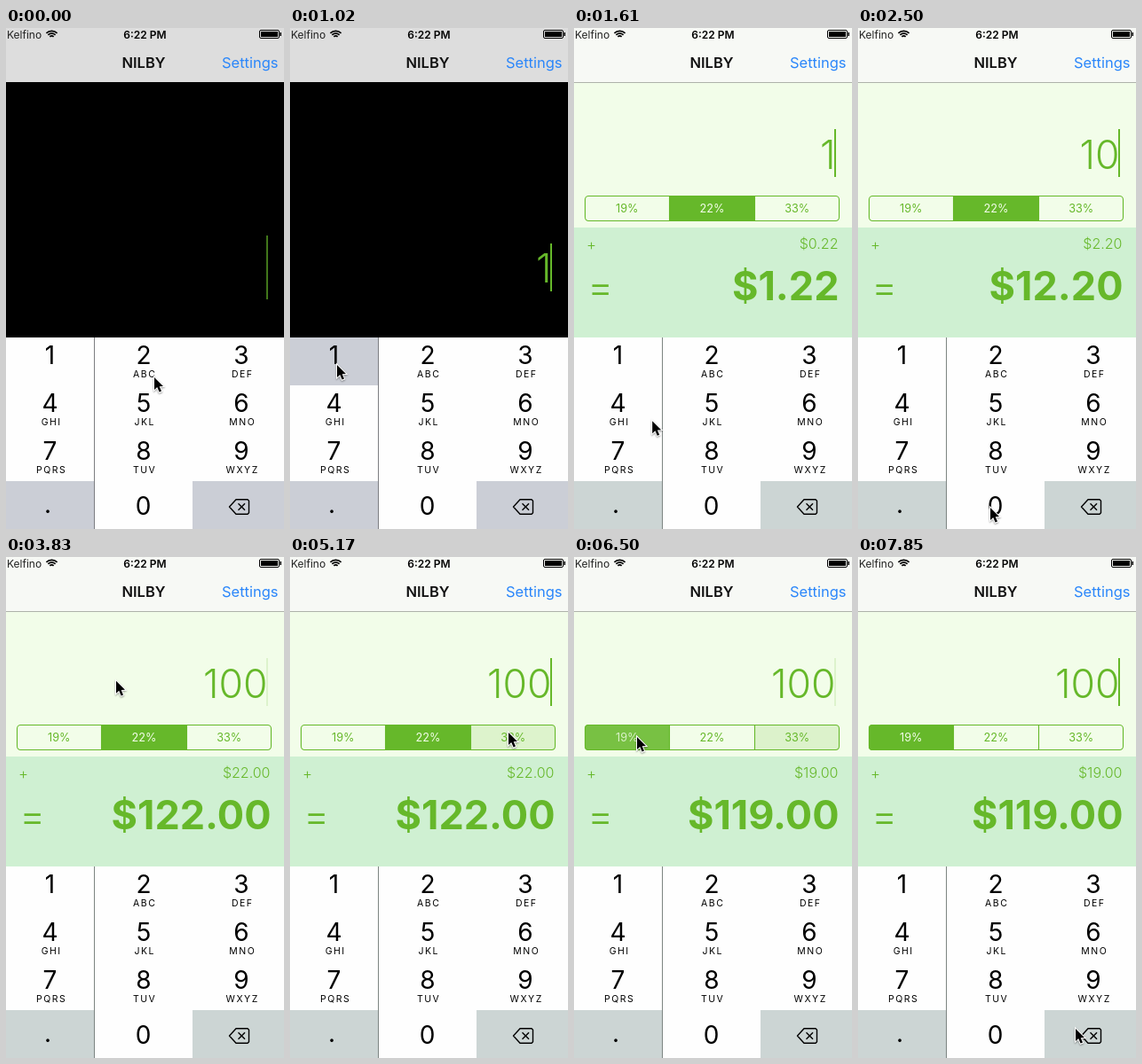
An HTML page with a canvas for the animation above (8 s loop, 313x565 px).

```html
<!DOCTYPE html>
<html lang="en">
<head>
<meta charset="utf-8">
<title>Tip calculator</title>
<style>
html, body { margin: 0; width: 100%; height: 100%; overflow: hidden; background: #000; }
canvas { display: block; width: 100vw; height: 100vh; }
</style>
</head>
<body>
<canvas id="stage"></canvas>
<script>
const W = 313, H = 565, LOOP = 8000;
const canvas = document.getElementById('stage');
const ctx = canvas.getContext('2d');
const ratio = window.devicePixelRatio || 1;
canvas.width = W * ratio;
canvas.height = H * ratio;

const GREEN = '#66b82a', PALE = '#f2fde9', MINT = '#cff0d2', INK = '#000';
const TYPED = [1020, 2300, 2740];
const RATES = [19, 22, 33];
const PRESSES = [
  { at: 5090, up: 5320, seg: 2 },
  { at: 6300, up: 6400, seg: 0 }
];
const KEYS = ['', 'ABC', 'DEF', 'GHI', 'JKL', 'MNO', 'PQRS', 'TUV', 'WXYZ'];
const COLUMNS = [50, 155, 265];

// Pointer path: time, x, y
const POINTER = [
  [0, 167, 394], [120, 167, 394], [500, 105, 390], [840, 53, 380], [1250, 53, 380],
  [1650, 92, 450], [2150, 149, 541], [3150, 149, 541], [3390, 110, 380],
  [3540, 76, 230], [3680, 90, 160], [3830, 124, 140], [3980, 124, 110],
  [4120, 112, 95], [4330, 112, 95], [4560, 135, 76], [4800, 200, 125],
  [5030, 246, 198], [5530, 246, 198], [6040, 71, 203], [6560, 71, 203],
  [6730, 130, 120], [6900, 190, 91], [7060, 245, 190], [7250, 262, 396],
  [7400, 258, 470], [7680, 245, 532], [8000, 245, 532]
];

const clamp = x => Math.max(0, Math.min(1, x));
const lerp = (a, b, p) => a + (b - a) * p;
const ease = x => x < 0.5 ? 2 * x * x : 1 - 2 * (1 - x) * (1 - x);
const mix = (a, b, p) => `rgb(${a.map((v, i) => Math.round(lerp(v, b[i], p))).join(',')})`;

function rect(x, y, w, h, color) {
  ctx.fillStyle = color;
  ctx.fillRect(x, y, w, h);
}

function text(str, x, y, size, { weight = 400, align = 'left', color = INK, spacing = 0 } = {}) {
  ctx.font = `${weight} ${size}px Inter, sans-serif`;
  ctx.letterSpacing = spacing + 'px';
  ctx.textAlign = align;
  ctx.fillStyle = color;
  ctx.fillText(str, x, y);
  ctx.letterSpacing = '0px';
}

function polyline(points, close) {
  ctx.beginPath();
  points.forEach(([x, y]) => ctx.lineTo(x, y));
  if (close) ctx.closePath();
}

function drawHeader(p) {
  rect(0, 0, W, 61, mix([221, 221, 221], [247, 249, 245], p));
  rect(0, 61, W, 1, mix([0, 0, 0], [174, 178, 170], p));

  text('Kelfino', 1, 11.5, 12, { color: '#222' });
  ctx.strokeStyle = INK;
  ctx.lineWidth = 1.7;
  for (const r of [3.6, 6.4, 9.2]) {
    ctx.beginPath();
    ctx.arc(51.5, 12, r - 0.6, -Math.PI * 0.75, -Math.PI * 0.25);
    ctx.stroke();
  }
  text('6:22 PM', 156.5, 11.5, 12, { weight: 600, align: 'center' });
  ctx.lineWidth = 1;
  ctx.beginPath();
  ctx.roundRect(285.5, 2.5, 22, 9, 1.5);
  ctx.stroke();
  rect(287, 4, 19, 6, INK);
  rect(308.5, 5, 1.5, 4, INK);

  text('NILBY', 155, 45, 16.5, { weight: 600, align: 'center', color: '#111' });
  text('Settings', 306.5, 45, 16.5, { align: 'right', color: '#2a86fa' });
}

function segmentFill(i, t) {
  let fill = i === 1 ? 1 : 0;
  for (const { at, up, seg } of PRESSES) {
    if (t < at) break;
    if (seg === i) fill = Math.max(fill, 0.15 * clamp((t - at) / 60));
    if (t >= up) fill = lerp(fill, seg === i ? 1 : 0, clamp((t - up) / 120));
  }
  return fill;
}

function drawSegments(t) {
  const edges = [12, 107.5, 203.5, 299];
  ctx.save();
  ctx.beginPath();
  ctx.roundRect(12, 189, 287, 29, 4);
  ctx.clip();
  RATES.forEach((rate, i) => {
    const fill = segmentFill(i, t), alpha = ctx.globalAlpha;
    ctx.globalAlpha = alpha * fill;
    rect(edges[i], 189, edges[i + 1] - edges[i], 29, GREEN);
    ctx.globalAlpha = alpha;
    text(rate + '%', (edges[i] + edges[i + 1]) / 2, 208, 12.7, {
      align: 'center',
      color: mix([102, 184, 42], [242, 253, 233], clamp((fill - 0.2) / 0.8))
    });
  });
  ctx.restore();
  ctx.strokeStyle = GREEN;
  ctx.lineWidth = 1.1;
  ctx.beginPath();
  ctx.roundRect(12.5, 189.5, 286, 28, 4);
  for (const x of edges.slice(1, 3)) {
    ctx.moveTo(x, 189);
    ctx.lineTo(x, 218);
  }
  ctx.stroke();
}

function drawResults(t, amount, fade) {
  rect(0, 61, W, 288, '#000');
  if (!fade) return;
  let rate = 22;
  for (const { up, seg } of PRESSES) if (t >= up) rate = RATES[seg];
  const tip = amount * rate / 100;
  ctx.save();
  ctx.globalAlpha = fade;
  rect(0, 62, W, 163, PALE);
  rect(0, 225, W, 124, MINT);
  drawSegments(t);
  text('+', 14, 249.5, 17, { weight: 300, color: GREEN });
  text('$' + tip.toFixed(2), 297.5, 249, 16, { weight: 300, align: 'right', color: GREEN });
  text('=', 15, 308, 45, { weight: 300, color: GREEN });
  text('$' + (amount + tip).toFixed(2), 298.5, 306.5, 45, { weight: 700, align: 'right', color: GREEN });
  ctx.restore();
}

function caretAlpha(t) {
  const last = TYPED.filter(k => k <= t).pop() ?? -948;
  const since = t - last;
  if (since < 600) return 1;
  const phase = (since - 1090) / 890;
  const gap = Math.abs(phase - Math.round(phase));
  return Math.max(0.15, clamp(0.15 + (gap - 0.06) / 0.2));
}

function drawField(t, count) {
  const rise = ease(clamp((t - TYPED[0]) / 450));
  const top = count ? lerp(243, 114, rise) : 234;
  if (count) text('100'.slice(0, count), 294.5, top + 44.5, 44.5, { weight: 300, align: 'right', color: GREEN });
  ctx.save();
  ctx.globalAlpha = caretAlpha(t);
  rect(293, top, 2, count ? 54 : 72, GREEN);
  ctx.restore();
}

function drawKeypad(t, p) {
  const side = mix([203, 206, 214], [204, 213, 212], p);
  rect(0, 349, W, 216, '#fefefe');
  rect(0, 511, 100, 54, side);
  rect(210, 511, 103, 54, side);

  const held = TYPED.findIndex(k => t >= k && t < k + 125);
  if (held === 0) rect(0, 349, 99, 54, side);
  if (held > 0) rect(100, 511, 110, 54, side);
  rect(99, 349, 1, 216, mix([125, 126, 130], [125, 133, 130], p));

  KEYS.forEach((letters, i) => {
    const x = COLUMNS[i % 3], y = 379 + 54 * Math.floor(i / 3);
    text(String(i + 1), x - (i % 3 ? 0 : 0.5), y, 28, { align: 'center' });
    text(letters, x + 1.2, y + 15, 10.5, { align: 'center', spacing: 1.5 });
  });
  text('0', 154.5, 548.5, 28, { align: 'center' });
  text('.', 47, 546.5, 28, { align: 'center' });

  ctx.strokeStyle = INK;
  ctx.lineWidth = 1.4;
  ctx.lineJoin = 'round';
  polyline([[251.5, 540], [259, 531.7], [272, 531.7], [273.5, 533.2], [273.5, 546.8], [272, 548.3], [259, 548.3]], true);
  ctx.stroke();
  polyline([[261.5, 536.3], [269, 543.8]]);
  ctx.stroke();
  polyline([[269, 536.3], [261.5, 543.8]]);
  ctx.stroke();
}

function drawPointer(t) {
  const i = POINTER.findIndex(k => k[0] > t);
  const [t0, x0, y0] = POINTER[i - 1], [t1, x1, y1] = POINTER[i];
  const p = (t - t0) / (t1 - t0);
  ctx.save();
  ctx.translate(lerp(x0, x1, p), lerp(y0, y1, p));
  polyline([[0, 0], [0, 14], [3.2, 11], [5.6, 16.6], [8, 15.6], [5.7, 10.2], [10, 10]], true);
  ctx.lineJoin = 'miter';
  ctx.lineWidth = 2;
  ctx.strokeStyle = '#fff';
  ctx.shadowColor = 'rgba(0,0,0,.4)';
  ctx.shadowBlur = 2 * ratio;
  ctx.shadowOffsetY = ratio;
  ctx.stroke();
  ctx.shadowColor = 'transparent';
  ctx.fillStyle = INK;
  ctx.fill();
  ctx.restore();
}

function draw(t) {
  ctx.setTransform(ratio, 0, 0, ratio, 0, 0);
  const count = TYPED.filter(k => t >= k).length;
  const fade = ease(clamp((t - TYPED[0]) / 560));
  drawResults(t, count ? 10 ** (count - 1) : 0, fade);
  drawHeader(fade);
  drawField(t, count);
  drawKeypad(t, fade);
  drawPointer(t);
}

const start = performance.now();
function tick() {
  draw((performance.now() - start) % LOOP);
  requestAnimationFrame(tick);
}
tick();
</script>
</body>
</html>
```
